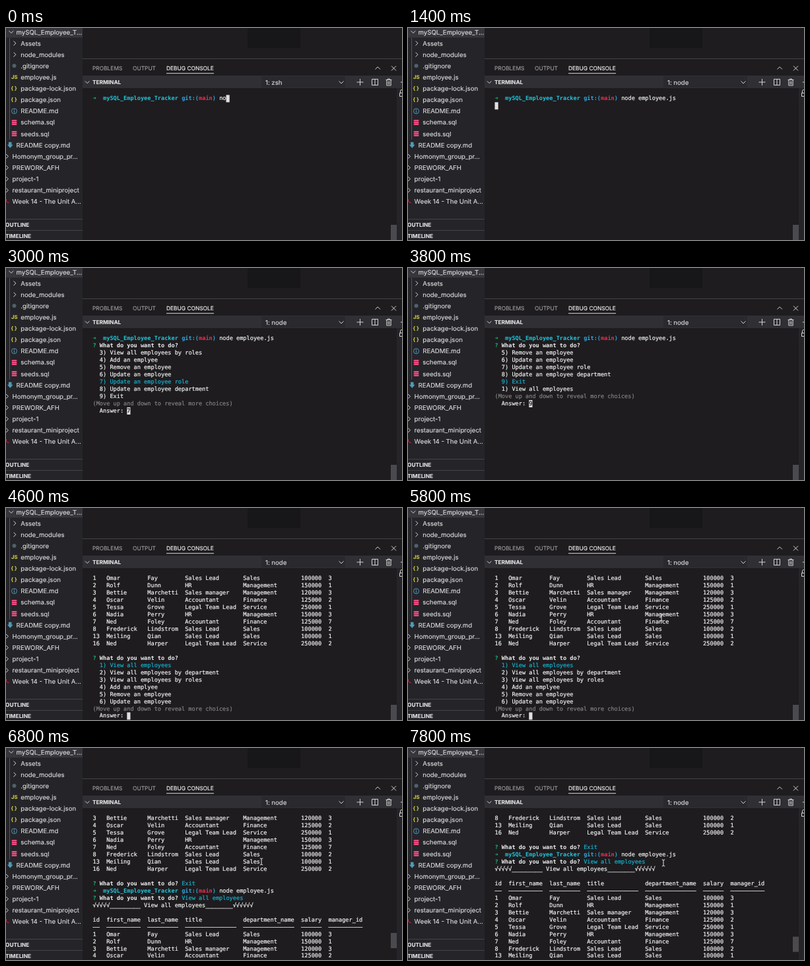
Animation, 600 px wide and 321 px high, one loop 8 s. Source, as an HTML page:

```html
<!DOCTYPE html>
<html lang="en">
<head>
<meta charset="utf-8">
<title>Employee tracker terminal</title>
<style>
  html, body { margin: 0; width: 100%; height: 100%; overflow: hidden; background: #1e1c1f; }
  svg { display: block; width: 600px; height: 321px; }
  text {
    white-space: pre; text-rendering: geometricPrecision; font: 9.6px Inter, sans-serif;
    color: #dcdcde; fill: currentColor; stroke: currentColor; stroke-width: .15;
  }
  .caps { font-size: 8.4px; color: #9a9a9c; }
  .on { color: #f4f4f4; }
  .head { font-size: 8.3px; font-weight: 700; color: #e0e0e2; }
  .type { font-size: 7.8px; font-weight: 700; color: #cbcb41; }
  #term text { font: 8.6px "DejaVu Sans Mono", monospace; color: #f0f0f0; stroke-width: .22; }
  #term .b { font-weight: 700; stroke-width: 0; }
  #term .green { color: #12bc79; }
  #term .cyan { color: #14b0cf; }
  #term .dir { color: #20c6dc; }
  #term .blue { color: #30a6df; }
  #term .red { color: #ea3050; }
  #term .dim { color: #808080; }
  #term .dark { color: #1e1c1f; }
  .line { fill: none; stroke: #d4d4d4; stroke-width: 1; }
  .rule { stroke: #434246; stroke-width: 1; }
</style>
</head>
<body>
<svg viewBox="0 0 600 321">
  <rect width="600" height="321" fill="#1e1c1f"/>
  <rect x="366" y="0" width="80" height="30" fill="#171618"/>

  <g id="side">
    <rect width="116" height="321" fill="#252428"/>
    <rect width="116" height="14.5" fill="#37363c"/>
    <path d="M5.5 15V169" stroke="#56555a"/>
    <path class="rule" d="M0 289.5H116M0 306.5H116"/>
    <text class="head" x="-1" y="301">OUTLINE</text>
    <text class="head" x="-1" y="317.5">TIMELINE</text>
  </g>

  <g id="panel">
    <path class="rule" d="M116 46.5H600"/>
    <rect x="116" y="72" width="484" height="19" fill="#302f33"/>
    <rect x="387" y="73" width="127" height="17" fill="#2a292d"/>
    <rect x="592" y="91" width="8" height="230" fill="#252428"/>
    <text class="caps" x="131" y="64">PROBLEMS</text>
    <text class="caps" x="192" y="64">OUTPUT</text>
    <text class="caps on" x="243" y="64">DEBUG CONSOLE</text>
    <path d="M243 68.7H315" stroke="#d8d8d8"/>
    <text class="head" x="131" y="85.2">TERMINAL</text>
    <text id="shell" x="393" y="85.5"></text>
    <g class="line">
      <path d="M120 80.5l3.2 3.2 3.2-3.2"/>
      <path d="M504.5 80.5l3.5 3.5 3.5-3.5"/>
      <path d="M559.5 62.5l3.7-3.7 3.7 3.7"/>
      <path d="M584 57.5l7 7m0-7l-7 7"/>
      <path d="M536.5 77v10M531.5 82h10"/>
      <path d="M554.5 77.5h9v9h-9zM559 77.5v9"/>
      <path d="M575.5 78.5h9M578.5 78.5v-1.5h3v1.5M576.8 78.5v8.5h6.4v-8.5M579 80.5v5M581 80.5v5"/>
      <path d="M600 98.5h-3.5v5h3.5M597.5 98v-2.5q0-2 2.5-2M598 82h2"/>
    </g>
  </g>

  <svg id="term" x="117" y="92" width="475" height="229" viewBox="117 92 475 229"></svg>
  <rect id="slider" x="583" width="9" height="23" fill="#4b4a4e"/>
  <path id="beam" d="M-2.2-5Q0-5 0-3.5Q0-5 2.2-5M0-3.5V3.5M-2.2 5Q0 5 0 3.5Q0 5 2.2 5" fill="none" stroke="#e8e8e8"/>
</svg>

<script>
const LOOP = 8000, COL = 5.18, ROW = 10.95, LEFT = 131.5, BASE = 109.4;
const $ = id => document.getElementById(id);

// Sidebar
const icons = {
  open: y => `<path class="line" d="M4.5 ${y - 1.7}l3.4 3.4 3.4-3.4"/>`,
  shut: y => `<path class="line" d="M11.5 ${y - 3.4}l3.4 3.4-3.4 3.4"/>`,
  edge: y => `<path class="line" d="M0 ${y - 3.4}l3.4 3.4-3.4 3.4"/>`,
  dot: y => `<circle cx="12.5" cy="${y}" r="3" fill="#4c626c"/>`,
  js: y => `<text class="type" x="8" y="${y + 2.8}">JS</text>`,
  json: y => `<text class="type" x="7.6" y="${y + 2.5}">{ }</text>`,
  info: y => `<circle cx="12.5" cy="${y}" r="4" fill="none" stroke="#519aba"/><path d="M12.5 ${y - 2.3}v1.2m0 .8v2.8" stroke="#519aba" stroke-width="1.2"/>`,
  sql: y => [-4, -1.2, 1.6].map(d => `<rect x="8.5" y="${y + d}" width="8" height="2.4" rx="1.1" fill="#f04a80"/>`).join(''),
  md: y => `<path d="M4 ${y - 4.5}h4.5v4h2.2l-4.4 5-4.4-5h2.1z" fill="#519aba"/>`,
  red: y => `<path d="M.5 ${y - 3.5}v3q0 2 4 2" fill="none" stroke="#c8303c"/>`
};
const files = [
  ['open', 15.6, 'mySQL_Employee_T...'], ['shut', 22.3, 'Assets'], ['shut', 22.3, 'node_modules'],
  ['dot', 22.3, '.gitignore'], ['js', 22.3, 'employee.js'], ['json', 22.3, 'package-lock.json'],
  ['json', 22.3, 'package.json'], ['info', 22.3, 'README.md'], ['sql', 22.3, 'schema.sql'],
  ['sql', 22.3, 'seeds.sql'], ['md', 15.6, 'README copy.md'], ['edge', 9.6, 'Homonym_group_pr...'],
  ['edge', 9.6, 'PREWORK_AFH'], ['edge', 9.6, 'project-1'], ['edge', 9.6, 'restaurant_miniproject'],
  ['red', 9.6, 'Week 14 - The Unit A...']
];
$('side').insertAdjacentHTML('beforeend', files.map(([icon, x, name], i) => {
  const y = 6 + i * 17.12;
  return icons[icon](y) + `<text x="${x}" y="${y + 3.5}">${name}</text>`;
}).join(''));

// Terminal content: a line is a list of [column, text, class]
const choices = ['View all employees', 'View all employees by department',
  'View all employees by roles', 'Add an emplyee', 'Remove an employee', 'Update an employee',
  'Update an employee role', 'Update an employee department', 'Exit'];
const jobs = {
  sales: ['Sales Lead', 'Sales', 100000], hr: ['HR', 'Management', 150000],
  boss: ['Sales manager', 'Management', 120000], acc: ['Accountant', 'Finance', 125000],
  legal: ['Legal Team Lead', 'Service', 250000]
};
const staff = [
  [1, 'Omar', 'Fay', 'sales', 3], [2, 'Rolf', 'Dunn', 'hr', 1], [3, 'Bettie', 'Marchetti', 'boss', 3],
  [4, 'Oscar', 'Velin', 'acc', 2], [5, 'Tessa', 'Grove', 'legal', 1], [6, 'Nadia', 'Perry', 'hr', 3],
  [7, 'Ned', 'Foley', 'acc', 7], [8, 'Frederick', 'Lindstrom', 'sales', 2],
  [13, 'Meiling', 'Qian', 'sales', 1], [16, 'Ned', 'Harper', 'legal', 2]
];
const widths = [4, 12, 11, 17, 17, 8, 10];
const row = cells => [[0, cells.map((c, i) => String(c).padEnd(widths[i])).join('')]];
const people = staff.map(([id, first, last, job, boss]) => row([id, first, last, ...jobs[job], boss]));
const header = ['id', 'first_name', 'last_name', 'title', 'department_name', 'salary', 'manager_id'];
const dashes = widths.map((w, i) => '–'.repeat(i < 6 ? w - 2 : w));

const prompt = cmd => [[0, '➜', 'b green'], [3, 'mySQL_Employee_Tracker', 'b dir'], [26, 'git:(', 'b blue'],
  [31, 'main', 'b red'], [35, ')', 'b blue'], [37, cmd]];
const ask = answer => [[0, '?', 'b green'], [2, 'What do you want to do?', 'b'], [26, answer, 'cyan']];

function menu(pick, typed) {
  const first = Math.max(1, pick - 4), count = pick === 6 || pick === 7 ? 7 : 6;
  const list = Array.from({ length: count }, (_, i) => {
    const n = (first + i - 1) % 9 + 1;
    return [[2, `${n}) ${choices[n - 1]}`, n === pick ? 'cyan' : '']];
  });
  return [ask(''), ...list, [[0, '(Move up and down to reveal more choices)', 'dim']],
    [[2, 'Answer:'], [10, '█', 'cursor'], [10, typed ? String(pick) : '', 'dark']]];
}

const history = [...people, [], ask('Exit')];
const output = [ask('View all employees'),
  [[0, '√√√√√' + '_'.repeat(9) + ' View all employees' + '_'.repeat(8) + '√√√√√√']],
  [], row(header), row(dashes), ...people, []];

// Timelines: [start, value]
const typing = [[0, 'no'], [400, 'node'], [600, 'node e'], [800, 'node em'], [1000, 'node employee.js']];
const picks = [[0, 1], [1800, 2], [2000, 3], [2200, 4], [2400, 5], [2800, 6], [3000, 7], [3200, 8],
  [3400, 9], [4000, 1]];
const tops = [[0, 0], [4600, 6], [6200, 4], [6400, -1], [6600, -6], [6800, -10], [7000, -9],
  [7200, -8], [7400, -7], [7600, -6], [7800, -5]];
const mouse = [[0, null], [5200, [430, 205]], [5400, [398, 172]], [5600, [381, 153]], [5800, [384, 166]],
  [6200, [386, 169]], [6800, [387, 172]], [7400, [387, 174]]];
const at = (list, t) => list.filter(([start]) => start <= t).pop()[1];

function screen(t) {
  const cmd = at(typing, t);
  if (t < 1200) return [[...prompt(cmd), [37 + cmd.length, '█', 'cursor']]];
  const head = prompt(cmd);
  if (t < 1600) return [head, [[0, '█', 'cursor']]];
  if (t < 4600) return [head, ...menu(at(picks, t), t >= 1800)];
  return [head, ...output, ...menu(1, false)];
}

function piece([col, text, cls = ''], line) {
  const x = LEFT + col * COL, y = BASE + line * ROW;
  if (cls === 'cursor') return `<rect x="${x}" y="${y - 8}" width="${COL}" height="11" fill="#e0e0e0"/>`;
  return text && `<text x="${x}" y="${y}" class="${cls}">${text}</text>`;
}

function draw(t) {
  const top = at(tops, t), beam = at(mouse, t);
  const lines = [...history, ...screen(t)];
  const start = history.length + top;
  $('term').innerHTML = lines.slice(start, start + 20)
    .map((line, i) => line.map(p => piece(p, i)).join('')).join('');
  $('shell').textContent = t < 1400 ? '1: zsh' : '1: node';
  $('slider').setAttribute('y', 298 - (t < 4600 ? 0 : 6 - top) * 1.12);
  $('beam').setAttribute('visibility', beam ? 'visible' : 'hidden');
  if (beam) $('beam').setAttribute('transform', `translate(${beam})`);
}

// Everything changes on a 200 ms beat
let shown = -1;
function tick() {
  const beat = Math.floor(performance.now() % LOOP / 200);
  if (beat !== shown) draw((shown = beat) * 200);
  requestAnimationFrame(tick);
}
tick();
</script>
</body>
</html>
```
